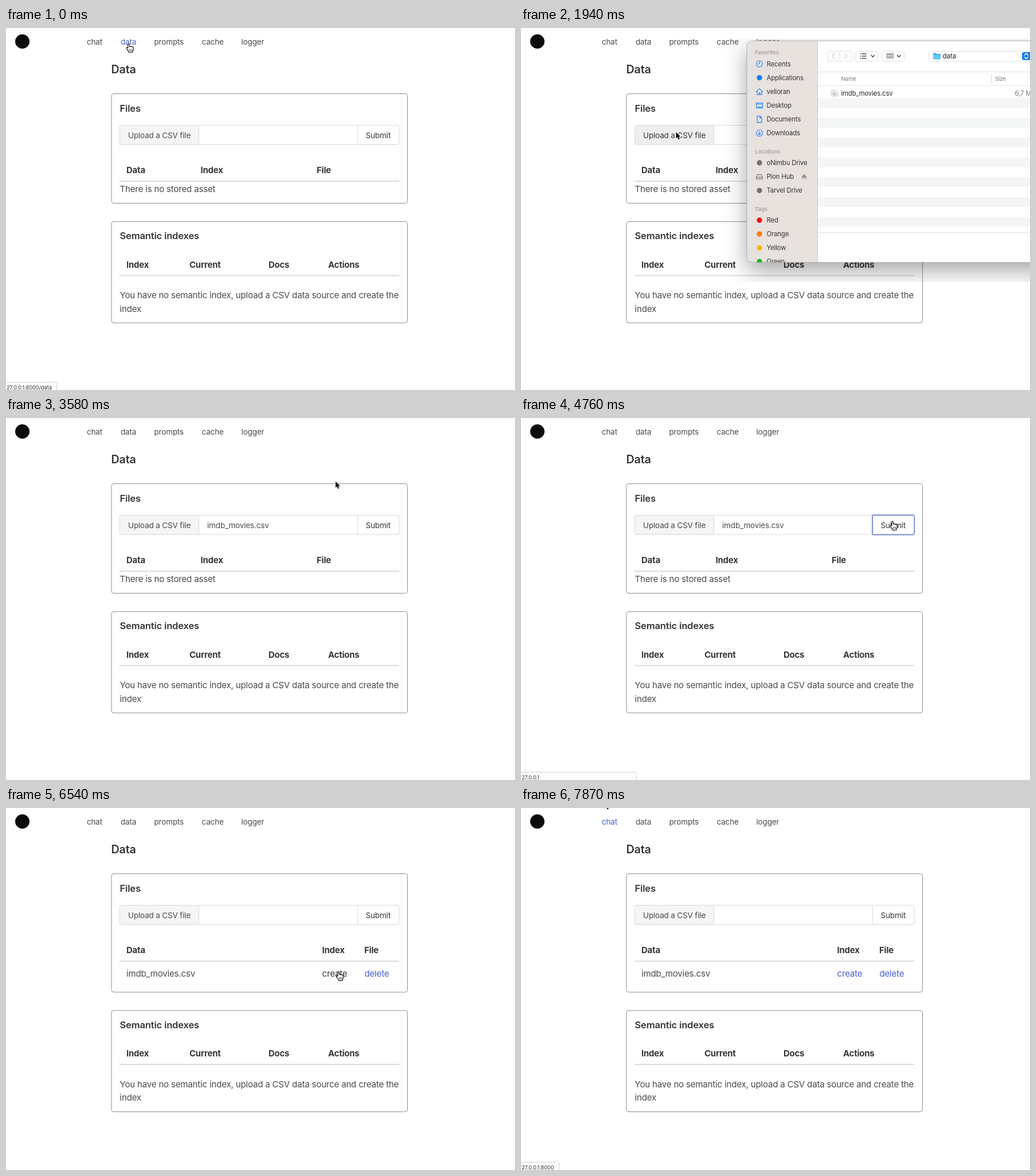
Recreate the animation shown at these times as an HTML page with a canvas. Size 888 by 631 pixels, loop 7990 ms.

```html
<!DOCTYPE html>
<html lang="en">
<head>
<meta charset="utf-8">
<title>Data upload</title>
<style>
html, body { margin: 0; width: 100%; height: 100%; overflow: hidden; background: #fff; }
canvas { display: block; }
</style>
</head>
<body>
<canvas id="stage" width="888" height="631"></canvas>
<script>
const ctx = document.getElementById('stage').getContext('2d');
const LOOP = 7990;
const INK = '#363636', TEXT = '#4a4a4a', LINK = '#485fc7', LINE = '#dbdbdb', BLUE = '#1a7ff0', GREY = '#77716f';
const FILE = 'imdb_movies.csv';

const smooth = p => p * p * (3 - 2 * p);
const easeOut = p => 1 - (1 - p) ** 3;

// Cursor moves: first step, last step, number of steps, end point, easing
const moves = [
  [300, 1050, 6, 271, 184, smooth],
  [1350, 1500, 2, 270, 182, smooth],
  [1790, 1790, 1, 270, 181, smooth],
  [2390, 2680, 3, 574.5, 110, smooth],
  [4170, 4620, 4, 648, 180, smooth],
  [5810, 6830, 8, 579, 287, easeOut],
  [7430, 7720, 3, 153, 20, smooth],
  [7870, 7870, 1, 146, -11, smooth]
];
const handSpans = [[0, 450], [900, 1790], [4470, 5810], [6400, 7430], [7720, 7870]];

function cursorAt(t) {
  let x = 214, y = 27;
  for (const [start, end, steps, toX, toY, ease] of moves) {
    if (t < start) break;
    const interval = (end - start) / Math.max(1, steps - 1) || 1;
    const step = Math.min(steps, Math.floor((t - start + 5) / interval) + 1);
    const p = ease(step / steps);
    x += (toX - x) * p;
    y += (toY - y) * p;
  }
  return [x, y];
}

function text(str, x, y, size, color = TEXT, weight = 400) {
  ctx.font = `${weight} ${size}px Inter, sans-serif`;
  ctx.letterSpacing = `${-0.012 * size}px`;
  ctx.fillStyle = color;
  ctx.fillText(str, x, y);
}

function box(x, y, w, h, radius, fill, stroke, width = 1) {
  ctx.beginPath();
  ctx.roundRect(x, y, w, h, radius);
  if (fill) { ctx.fillStyle = fill; ctx.fill(); }
  if (stroke) { ctx.strokeStyle = stroke; ctx.lineWidth = width; ctx.stroke(); }
}

function rect(x, y, w, h, color) {
  ctx.fillStyle = color;
  ctx.fillRect(x, y, w, h);
}

function dot(x, y, r, color) {
  ctx.beginPath();
  ctx.arc(x, y, r, 0, 7);
  ctx.fillStyle = color;
  ctx.fill();
}

function path(d, x, y, stroke, fill, width = 1.1) {
  const shape = new Path2D(d);
  ctx.save();
  ctx.translate(x, y);
  ctx.lineJoin = ctx.lineCap = 'round';
  ctx.lineWidth = width;
  if (fill) { ctx.fillStyle = fill; ctx.fill(shape); }
  if (stroke) { ctx.strokeStyle = stroke; ctx.stroke(shape); }
  ctx.restore();
}

function drawNav(active) {
  dot(28.5, 23.5, 12.5, '#0b0b0b');
  const items = [['chat', 141], ['data', 200], ['prompts', 258.5], ['cache', 341.5], ['logger', 410.5]];
  for (const [label, x] of items) text(label, x, 29, 13.5, label === active ? LINK : TEXT);
}

function headers(y, ...cells) {
  for (const [label, x] of cells) text(label, x, y, 14.9, INK, 700);
  rect(198, y + 13, 488, 2, LINE);
}

function drawUpload(t) {
  const labelHover = t >= 900 && t < 2390;
  const focused = t >= 4760 && t < 4910;
  const submitHover = t >= 4470 && t < 5810;
  box(198.5, 169.5, 487, 33.5, 3, '#fff', LINE);
  box(198.5, 169.5, 138, 33.5, [3, 0, 0, 3], labelHover ? '#eee' : '#f5f5f5', LINE);
  text('Upload a CSV file', 213, 191.5, 13.5, labelHover ? INK : TEXT);
  if (t >= 3580 && t < 4910) text(FILE, 351, 191.5, 13.5);
  if (focused) box(612.5, 168.5, 74, 35.5, 3, null, 'rgba(72,95,199,.25)', 3);
  box(613.5, 169.5, 72.5, 33.5, [0, 3, 3, 0], '#fff', focused ? LINK : submitHover ? '#b5b5b5' : LINE);
  text('Submit', 627.5, 191.5, 13.5, INK);
}

function drawPage(t) {
  const stored = t >= 4910;
  const shift = stored ? 15.5 : 0;
  drawNav(t < 450 ? 'data' : t >= 7720 ? 'chat' : '');
  text('Data', 183.5, 79, 19.8, INK, 600);

  box(184, 114.5, 516.5, 191 + shift, 4, '#fff', '#8c8c8c');
  text('Files', 198.5, 145.5, 16.6, INK, 600);
  drawUpload(t);
  headers(253, ['Data', 210], ['Index', stored ? 551.5 : 339.5], ['File', stored ? 625 : 542]);
  if (stored) {
    text(FILE, 210, 293.5, 15.05);
    text('create', 551.5, 293.5, 15.05, t >= 6400 && t < 7430 ? INK : LINK);
    text('delete', 625.5, 293.5, 15.05, LINK);
  } else {
    text('There is no stored asset', 198.5, 286, 15.05);
  }

  ctx.save();
  ctx.translate(0, shift);
  box(184, 337.5, 516.5, 176.5, 4, '#fff', '#8c8c8c');
  text('Semantic indexes', 198.5, 368, 16.6, INK, 600);
  headers(417.5, ['Index', 210], ['Current', 320], ['Docs', 458], ['Actions', 562]);
  text('You have no semantic index, upload a CSV data source and create the', 198.5, 471, 15.05);
  text('index', 198.5, 494.5, 15.05);
  ctx.restore();
}

function drawStatus(t) {
  let label, width;
  if (t < 600) [label, width] = ['27.0.0.1:8000/data', 88];
  else if (t >= 4760 && t < 4910) [label, width] = ['27.0.0.1', 201];
  else if (t >= 6980 && t < 7720) [label, width] = ['27.0.0.1:8000/embed?doc=asset:file:8f3e0c21b7d94a65b1c2e7f09d3a', 339];
  else if (t >= 7720) [label, width] = ['27.0.0.1:8000', 66];
  else return;
  box(-5, 617.5, width + 5.5, 20, 3, '#fff', '#cfcfcf');
  text(label, 1, 629.5, 9.4, '#333');
}

const icons = {
  clock: 'M11.5 6a5.5 5.5 0 1 1-11 0a5.5 5.5 0 1 1 11 0M6 2.5V6H3.5',
  house: 'M.5 6L6 .8L11.5 6M2 5V11.5H10V5M5 11.5V8H7V11.5',
  desktop: 'M.5 1.5H11.5V10.5H.5ZM.5 3.5H11.5M2.5 8.7H9.5',
  page: 'M2 .5H7L10 3.5V11.5H2ZM7 .5V3.5H10',
  download: 'M11.5 6a5.5 5.5 0 1 1-11 0a5.5 5.5 0 1 1 11 0M6 3V8.5M3.8 6.5L6 8.7L8.2 6.5',
  disk: 'M.5 7L2.5 2.5H9.5L11.5 7V10H.5ZM.5 7H11.5'
};

function sidebarItem(label, y, icon, color) {
  if (icon) path(icons[icon], 410, y - 6, color);
  else dot(416, y, 4.7, color);
  text(label, 428.5, y + 4, 11.3, '#35312f');
}

function drawSidebar() {
  const caption = (label, y) => text(label, 408, y + 3.5, 9.6, '#a9a19e', 600);
  rect(394, 22, 124, 387, '#e8e2df');
  rect(517, 22, 1, 387, '#d3ccc9');
  caption('Favorites', 42);
  [['Recents', 'clock'], ['Applications', ''], ['velloran', 'house'], ['Desktop', 'desktop'],
    ['Documents', 'page'], ['Downloads', 'download']]
    .forEach(([label, icon], i) => sidebarItem(label, 62.5 + i * 24.15, icon, BLUE));
  caption('Locations', 215);
  [['oNimbu Drive', ''], ['Plon Hub', 'disk'], ['Tarvel Drive', '']]
    .forEach(([label, icon], i) => sidebarItem(label, 235 + i * 24.1, icon, GREY));
  path('M0 5L4 0L8 5ZM0 7.5H8', 490, 255, '#8f8885', '#8f8885', .8);
  caption('Tags', 315);
  [['Red', '#f80d12'], ['Orange', '#ff7c08'], ['Yellow', '#f3b60a'], ['Green', '#08b91c']]
    .forEach(([label, color], i) => sidebarItem(label, 335 + i * 24.1, '', color));
}

function drawToolbar() {
  for (const [x, w] of [[535, 42], [582.5, 40], [629, 39.5], [711.5, 190]]) box(x, 40.5, w, 17.5, 4, '#fff', '#dedede');
  rect(555.5, 42, 1, 14, '#dedede');
  path('M4 0L0 4.5L4 9', 543, 44.5, '#b9b9b9');
  path('M0 0L4 4.5L0 9', 564.5, 44.5, '#b9b9b9');
  path('M0 0H.5M3 0H10M0 4H.5M3 4H10M0 8H.5M3 8H10', 592, 45, '#444', null, 1.3);
  for (let i = 0; i < 6; i++) box(638 + i % 3 * 4.3, 44.5 + (i > 2 ? 5 : 0), 2.8, 3, .5, null, '#555', .9);
  path('M0 0L2.7 3L5.4 0', 611, 47.5, '#444', null, 1.4);
  path('M0 0L2.7 3L5.4 0', 656.5, 47.5, '#444', null, 1.4);
  path('M0 1Q0 0 1 0H4.5L6 1.5H12Q13 1.5 13 2.5V10Q13 11 12 11H1Q0 11 0 10Z', 719, 43.5, null, '#3fb1e6');
  rect(719, 47, 13, 6.5, '#63c8f3');
  text('data', 735.5, 53, 11.7, '#222');
  box(874, 42, 20, 14, 4, BLUE);
  path('M0 3L3 0L6 3M0 6.5L3 9.5L6 6.5', 878.5, 44.3, '#fff', null, 1.5);
}

function drawFileList(selected) {
  rect(518, 76, 370, 1, '#e0e0e0');
  text('Name', 558.5, 91.5, 9.6, '#777');
  rect(820, 80, 1, 16, '#d8d8d8');
  text('Size', 827, 91.5, 9.6, '#777');
  rect(518, 100, 370, 1, '#e6e6e6');
  for (let row = 1; row < 14; row += 2) rect(518, Math.round(105 + row * 17.25), 370, 17, '#f4f5f5');
  if (selected) rect(518, 105, 370, 17, '#0063dc');
  path('M0 0H8L11 3V10H0Z', 542, 109, '#b9bcc0', '#f4f4f4', .8);
  path('M2 3.5H6M2 5.5H8M2 7.5H8', 542, 109, '#8b939c', null, .8);
  text(FILE, 558.5, 118, 11.3, selected ? '#fff' : '#222');
  text('6,7 MB', 861.5, 118, 11.3, selected ? '#d3e4fa' : '#777');
  rect(518, 356, 370, 1, '#e0e0e0');
}

function drawDialog(selected) {
  ctx.save();
  ctx.beginPath();
  ctx.rect(352, 19, 536, 424);
  ctx.clip();
  ctx.shadowColor = 'rgba(0,0,0,.36)';
  ctx.shadowBlur = 38;
  ctx.shadowOffsetY = 14;
  box(394, 22.5, 540, 386, 9, '#fff');
  ctx.shadowColor = 'transparent';
  ctx.save();
  ctx.clip();
  drawSidebar();
  drawToolbar();
  drawFileList(selected);
  ctx.restore();
  box(394, 22.5, 540, 386, 9, null, '#a9a7a6', .8);
  ctx.restore();
}

function drawCursor(t) {
  const [x, y] = cursorAt(t);
  if (handSpans.some(([from, to]) => t >= from && t < to)) {
    path('M-1.3 8V1.4Q-1.3 0 0 0Q1.3 0 1.3 1.4V5Q2.6 4 3.8 5.4Q5.3 4.6 6.2 6Q8.2 5.6 8.2 7.6V10.5Q8 12.5 6.8 13.6V15.5H.2V14Q-2 12 -3.6 8.8Q-4.2 7 -2.8 6.8Q-1.9 6.9 -1.3 8Z',
      x, y, '#111', '#fff', 1.2);
    path('M1.7 10V13M3.6 10V13M5.5 10V13', x, y, '#222', null, .8);
  } else {
    const arrow = 'M.5 .5V11.5L3 9.2L4.8 13.4L6.7 12.6L4.9 8.5H8.4Z';
    path(arrow, x, y, '#fff', null, 1.8);
    path(arrow, x, y, null, '#000');
  }
}

function frame(now) {
  const t = now % LOOP;
  rect(0, 0, 888, 631, '#fff');
  drawPage(t);
  drawStatus(t);
  if (t >= 1940 && t < 3580) drawDialog(t >= 3130);
  drawCursor(t);
}

let origin;
function tick(now) {
  origin ??= now;
  frame(now - origin);
  requestAnimationFrame(tick);
}
frame(0);
requestAnimationFrame(tick);
</script>
</body>
</html>
```
